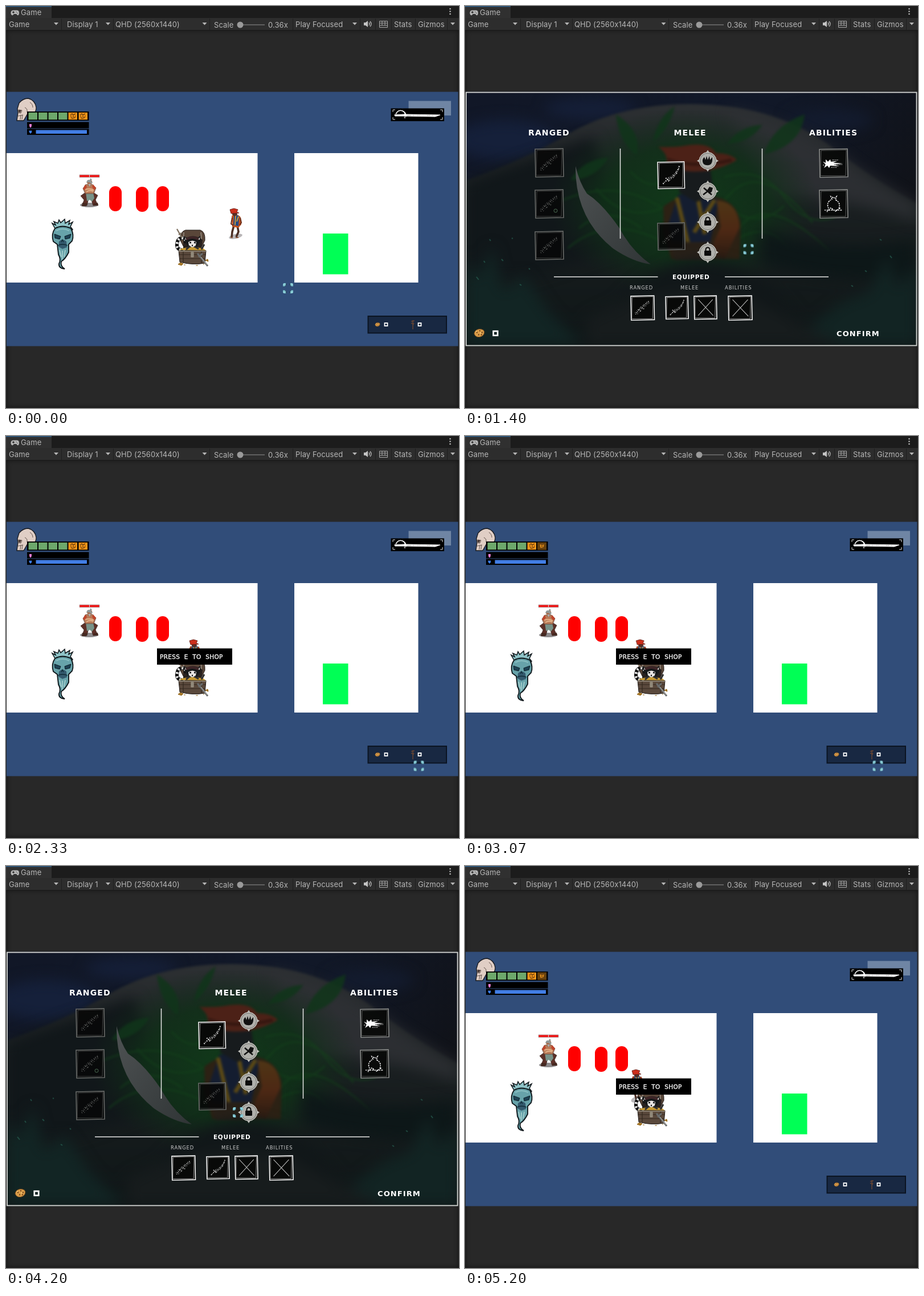
These frames come from a looping animation (795 by 705 pixels, 5270 ms). An HTML page:

```html
<!DOCTYPE html>
<html lang="en">
<head>
<meta charset="utf-8">
<title>Game view</title>
<style>
  html, body { margin: 0; width: 100%; height: 100%; overflow: hidden; background: #282828; }
  .well { position: absolute; inset: 42px 0 0 0; box-shadow: inset 0 0 9px #111; }
  svg { position: absolute; left: 0; top: 0; display: block; }
  .ui text { font: 13px Inter, "Open Sans", sans-serif; letter-spacing: .1px; fill: #b6b6b6; }
  .pix { font: bold 14px "DejaVu Sans", sans-serif; letter-spacing: 1.1px; fill: #fff; }
  .sub { font-size: 8.4px; font-weight: normal; letter-spacing: .9px; fill: #ccc; }
  .card { vector-effect: non-scaling-stroke; fill: #080908; stroke: currentColor; }
  .dim { color: #696b69; fill-opacity: .75; }
  .grey { color: #8b8d8b; fill-opacity: .8; }
  .lit { color: #f4f4f4; }
  .ink { fill: none; stroke: currentColor; }
  .soft { filter: blur(12px); }
  .haze { filter: blur(2px); }

  .aim, .pirate, .ghost, .torso, .dagger, .shop, .prompt, .hurt, .stride, .stand {
    animation: 5270ms linear infinite;
  }
  .aim { animation-name: aim; }
  .pirate { animation-name: walk; }
  .ghost { animation-name: bob; animation-timing-function: ease-in-out; }
  .torso { animation-name: breathe; animation-timing-function: ease-in-out; }
  .dagger { animation-name: fly; }
  .shop, .prompt, .hurt, .stride, .stand { animation-timing-function: step-end; }
  .shop { animation-name: shop; }
  .prompt { animation-name: prompt; }
  .hurt { animation-name: hurt; }
  .stride { animation-name: stride; }
  .stand { animation-name: stand; }

  @keyframes aim {
    0% { transform: translate(495px, 495px); animation-timing-function: steps(8); }
    10.03%, 29.01% { transform: translate(497.5px, 426.5px); animation-timing-function: steps(6); }
    36.61% { transform: translate(749px, 570px); animation-timing-function: steps(2); }
    39.14% { transform: translate(729px, 582px); animation-timing-function: step-end; }
    40.41%, 69.52% { transform: translate(724.5px, 578.5px); animation-timing-function: steps(2); }
    72.05% { transform: translate(690px, 588px); animation-timing-function: steps(5); }
    78.38% { transform: translate(415px, 425px); animation-timing-function: step-end; }
    79.65% { transform: translate(407px, 432px); animation-timing-function: steps(6); }
    87.24% { transform: translate(288.5px, 682px); animation-timing-function: steps(2); }
    89.77%, 100% { transform: translate(280px, 725px); }
  }
  @keyframes walk {
    0% { transform: translate(0, 0); animation-timing-function: steps(10); }
    12.56% { transform: translate(6px, 2px); animation-timing-function: steps(3); }
    16.36% { transform: translate(-2.5px, 2px); animation-timing-function: steps(6); }
    23.95%, 54.33% { transform: translate(-71px, 2px); animation-timing-function: steps(4); }
    59.39%, 100% { transform: translate(-100px, 2px); }
  }
  @keyframes bob {
    0% { transform: translateY(0); }
    12.56% { transform: translateY(3.3px); }
    25.22%, 44.2% { transform: translateY(0); }
    56.86% { transform: translateY(3.3px); }
    64.46%, 80.91% { transform: translateY(.7px); }
    85.98% { transform: translateY(0); }
    98.63%, 100% { transform: translateY(3.1px); }
  }
  @keyframes breathe {
    0%, 25.22%, 44.2%, 85.98% { transform: translateY(0); }
    12.56%, 56.86%, 100% { transform: translateY(1px); }
    64.46%, 80.91% { transform: translateY(.3px); }
  }
  @keyframes fly {
    0%, 80.9% { transform: translate(310px, 382px); visibility: hidden; }
    80.91% { transform: translate(310px, 382px); visibility: visible; animation-timing-function: steps(5); }
    87.24% { transform: translate(710px, 240px); visibility: visible; animation-timing-function: steps(2); }
    89.77% { transform: translate(870px, 183px); visibility: visible; }
    89.8%, 100% { transform: translate(870px, 183px); visibility: hidden; }
  }
  @keyframes shop {
    0% { opacity: 0; }
    25.22% { opacity: .6; }
    26.48% { opacity: 1; }
    44.2% { opacity: 0; }
    64.46% { opacity: .6; }
    65.72% { opacity: 1; }
    80.91%, 100% { opacity: 0; }
  }
  @keyframes prompt { 0% { visibility: hidden; } 22.68%, 100% { visibility: visible; } }
  @keyframes hurt { 0% { opacity: 0; } 56.86%, 100% { opacity: 1; } }
  @keyframes stride {
    0%, 7.49%, 17.62%, 22.68% { opacity: 1; }
    3.7%, 11.29%, 20.15%, 23.95%, 100% { opacity: 0; }
  }
  @keyframes stand {
    0%, 7.49%, 17.62%, 22.68% { opacity: 0; }
    3.7%, 11.29%, 20.15%, 23.95%, 100% { opacity: 1; }
  }
</style>
</head>
<body>
<div class="well"></div>
<svg width="795" height="705" viewBox="0 0 795 705">
  <defs>
    <clipPath id="view"><rect x="1" y="150.500" width="792.500" height="446"/></clipPath>
    <radialGradient id="glow"><stop offset="0" stop-color="#113a1a"/><stop offset=".6" stop-color="#103018" stop-opacity=".85"/><stop offset="1" stop-color="#122a1a" stop-opacity="0"/></radialGradient>
    <linearGradient id="night" x2="1" y2=".4"><stop offset="0" stop-color="#111727"/><stop offset=".6" stop-color="#111828"/><stop offset="1" stop-color="#101218"/></linearGradient>
    <linearGradient id="dome" x2="0" y2="1"><stop offset="0" stop-color="#2d3033"/><stop offset=".35" stop-color="#1b2022"/><stop offset="1" stop-color="#0f1617"/></linearGradient>
    <linearGradient id="steel" x2="1" y2="1"><stop offset="0" stop-color="#4e5253"/><stop offset="1" stop-color="#303536"/></linearGradient>
    <linearGradient id="sleeve" x2="0" y2="1"><stop offset="0" stop-color="#4f3515"/><stop offset=".5" stop-color="#4d2814"/><stop offset="1" stop-color="#2a1b12"/></linearGradient>
    <path id="drop" d="M-4-2h8l-4 4.500z" fill="#b6b6b6"/>
    <rect id="pill" width="22" height="44" rx="11" fill="#f00"/>
    <rect id="cell" width="15.500" height="12.500"/>
    <rect id="zero" x="-2.500" y="-2.500" width="5" height="5" fill="none" stroke="#fff" stroke-width="1.800"/>
    <g id="cookie">
      <path d="M-9 1Q-8-6 0-7Q8-7 9-2Q9 5 1 7Q-7 8-9 1Z" fill="#d99c48" stroke="#6d451d"/>
      <path d="M-5-1h2M0-4h2M4-1h2M-2 3h2M3 3h2" stroke="#6b3b18" stroke-width="2"/>
      <path d="M-6-3h2M1 0h2" stroke="#f3cf86" stroke-width="1.500"/>
    </g>
    <path id="bite" d="M-5-2l3-2 2 2 4-2M-4 2l2 2 4-1 2-2M-1 0l2 1M-4-1v2M4-1v1" fill="none" stroke="#6b4012" stroke-width="1.500"/>
    <g id="frame">
      <path class="card" d="M0 1 49 0 50 49 1 50Z" stroke-width="1.600"/>
      <path class="card" d="M3 3 47 2 46 47 2 47Z" stroke-width=".7" opacity=".8"/>
    </g>
    <g id="gun" class="ink" opacity=".85">
      <path d="M10 38L17 29 38 12M17 29l5 3M24 25l4 2" stroke-width="2.400" stroke-dasharray="1 2.400 1.500 1.800"/>
      <path d="M9 35L18 25 38 10M14 38L22 29 40 14" stroke-width="1" stroke-dasharray="2 3 1 2"/>
    </g>
    <g id="blade" class="ink" opacity=".9">
      <path d="M10 41L18 33M15 30L22 37M18 33Q34 28 40 8" stroke-width="2.200" stroke-dasharray="2 1.600 1 2"/>
      <path d="M21 35Q37 27 40 9M19 30Q30 25 35 17" stroke-width="1" stroke-dasharray="3 2 1 3"/>
    </g>
    <path id="cross" class="ink" d="M9 8L42 42M41 8L9 42" stroke-width="1.300" opacity=".75"/>
    <g id="medal">
      <path d="M0-19L4-13H-4ZM0 19L4 13H-4ZM-19 0L-13-4V4ZM19 0L13-4V4Z" fill="#b9b9b4"/>
      <circle r="15" fill="#b0b0ab" stroke="#cfcfca" stroke-width="1"/>
      <circle r="13.500" fill="none" stroke="#62645f" stroke-width=".8"/>
    </g>
    <g id="lock"><rect x="-6" y="-2" width="12" height="9" rx="1" fill="#0b0b0b"/><path d="M-3.500-2V-4a3.500 3.500 0 0 1 7 0V-2" fill="none" stroke="#0b0b0b" stroke-width="2"/></g>
    <g id="corner"><path d="M-9-7.500L-7.500-9H-3.500V-5.500L-5-3.500H-9Z" fill="#7dc3cf"/><path d="M-3.500-8.500V-5.500L-5.500-3.500" fill="none" stroke="#24404f"/><path d="M-8-7h2" stroke="#b9e4ea"/></g>
  </defs>

  <!-- editor chrome -->
  <g class="ui">
    <path d="M0 0H795V21H0Z" fill="#1c1c1c"/>
    <path d="M0 0H80V21H0Z" fill="#303030"/>
    <path d="M0 .8H80" stroke="#2c5d87" stroke-width="1.600"/>
    <path d="M0 21H795V42H0Z" fill="#2d2d2d"/>
    <path d="M0 42.500H795" stroke="#191919"/>
    <path d="M97.500 22V42M188.500 22V42M357.500 22V42M503.500 22V42M621.500 22V42M648.500 22V42M676.500 22V42M718.500 22V42M774.500 22V42" stroke="#1f1f1f"/>
    <path d="M12 7.500H20Q23 8 23 12T20.500 16.500L18 14H14L11.500 16.500Q8.500 16 8.500 12T12 7.500Z" fill="#b6b6b6"/>
    <path d="M11 11h4M13 9v4M18 10v1M20 12v1" stroke="#303030" stroke-width="1.300"/>
    <g fill="#bbb"><circle cx="779.500" cy="5" r="1.300"/><circle cx="779.500" cy="9.500" r="1.300"/><circle cx="779.500" cy="14" r="1.300"/></g>
    <text x="26" y="16">Game</text>
    <text x="5" y="37">Game</text>
    <text x="107" y="37">Display 1</text>
    <text x="192" y="37">QHD (2560x1440)</text>
    <text x="365" y="38">Scale</text>
    <text x="460" y="38">0.36x</text>
    <text x="508" y="37">Play Focused</text>
    <text x="681" y="37">Stats</text>
    <text x="723" y="37">Gizmos</text>
    <use href="#drop" x="88" y="31"/><use href="#drop" x="179" y="31"/><use href="#drop" x="348.500" y="31"/><use href="#drop" x="612" y="31"/><use href="#drop" x="784" y="31"/>
    <path d="M415 33H454" stroke="#606060" stroke-width="2"/><circle cx="411" cy="33" r="5.500" fill="#9a9a9a"/>
    <path d="M628 29H631L635 26V37L631 34H628Z" fill="#c4c4c4"/>
    <path d="M637 29q2 2.500 0 5M639 27q4 4.500 0 9" fill="none" stroke="#c4c4c4" stroke-width="1.300"/>
    <path d="M655.500 26.500H669.500V37.500H655.500ZM655 30H670M655 34H670M660 26V34M665 26V34" fill="none" stroke="#aaa"/>
  </g>

  <g clip-path="url(#view)">
    <!-- scene -->
    <path d="M1 150H794V597H1Z" fill="#314d79"/>
    <path d="M1 258H441.500V485H1ZM506 258H723.500V485H506Z" fill="#fff"/>
    <path d="M556 399H600.500V470.500H556Z" fill="#00ff55"/>
    <use href="#pill" x="181" y="316"/><use href="#pill" x="228" y="317"/><use href="#pill" x="264" y="316"/>

    <!-- brawler -->
    <g>
      <path d="M129 296H164V300.500H129Z" fill="#ef1717" stroke="#aaa" stroke-width=".8"/><path d="M146.500 296V300" stroke="#ddd"/>
      <ellipse cx="146" cy="349" rx="16" ry="4" fill="#8d8a8c"/>
      <path d="M138 328L131 333 137 340 134 349 142 350 145 338 149 338 153 350 161 349 157 340 161 332 153 327Z" fill="#5d3028" stroke="#30201c" stroke-width=".7"/>
      <path d="M134 345l8 1-1 5h-8zM154 346l7-1 1 5h-8z" fill="#442820"/>
      <path d="M140 327H153L155 337 151 343 147 340 142 342Z" fill="#789389"/>
      <g class="torso">
        <path d="M140 313L135 320 139 329H154L158 319 152 313Z" fill="#b87b58" stroke="#56362c" stroke-width=".7"/>
        <path d="M139 313L135 321 139 323 142 317ZM153 313L158 319 155 323 151 317Z" fill="#c0452c"/>
        <path d="M139 322Q147 319 154 323M141 326Q147 322 153 325" fill="none" stroke="#e2b28a" stroke-width="2"/>
        <path d="M142 309Q142 305 147 305T151 310L148 317 144 315Z" fill="#a56d50"/>
        <path d="M141 310Q142 304 147 305L148 302 151 304 149 307Q154 309 150 312Q146 307 141 310Z" fill="#939a99"/>
        <path d="M144 312h5l-2 5z" fill="#a9adab"/>
      </g>
    </g>

    <!-- ghost -->
    <g class="ghost">
      <path d="M86 390L81 381 87 384 84 378 91 381 93 375 96 380 103 374 104 381 112 376 110 383 117 379 113 387 117 392 112 398H88Z" fill="#8fc4c8" stroke="#0a1115" stroke-width="1.500"/>
      <path d="M86 390Q99 383 114 390Q120 402 116 412L110 418 110 432Q104 444 97 448Q95 456 103 461Q92 460 93 452Q97 444 92 436L90 418 83 413Q79 400 86 390Z" fill="#67a3aa" stroke="#0a1115" stroke-width="1.800"/>
      <path d="M85 400L96 404 94 409 86 407ZM114 400L103 404 104 409 112 407Z" fill="#1e4355" stroke="#0b1c25"/>
      <path d="M93 413Q99 406 106 413L107 423 99 426 92 422Z" fill="#345a6e"/>
      <path d="M97 414l2-4 2 4M91 420Q99 416 108 420" fill="none" stroke="#102b36" stroke-width="1.300"/>
      <path d="M94 428L97 440M99 429L99 444M104 428L102 440" stroke="#b7dad6" stroke-width="1.300"/>
      <path d="M88 394q11-6 23 0" fill="none" stroke="#8bc0c3" stroke-width="2"/>
    </g>

    <!-- pirate -->
    <g class="pirate">
      <g class="stride">
        <ellipse cx="403" cy="404" rx="12" ry="4" transform="rotate(-12 403 404)" fill="#b9b6b8"/>
        <path d="M400 385L397 396 396 406M406 385L408 396 404 405" fill="none" stroke="#4d3025" stroke-width="3.600"/>
        <path d="M394 406h4M403 406h5" stroke="#8b5940" stroke-width="2"/>
        <path d="M396 368Q403 363 411 369L413 383 408 389 397 387Z" fill="#c5541f"/>
        <path d="M400 366L409 368 408 386 399 384Z" fill="#254a85"/><path d="M403 367L402 384M408 369L405 378" stroke="#e0a32f" stroke-width="1.700"/>
        <path d="M397 371L395 382 399 385M411 371L413 380 410 384" fill="none" stroke="#6c2e1b" stroke-width="2"/>
      </g>
      <g class="stand">
        <ellipse cx="401" cy="407" rx="10" ry="5" transform="rotate(-20 401 407)" fill="#bbb9bb"/>
        <path d="M398 384L398 396 401 409M404 384L405 396 403 410" fill="none" stroke="#4d3025" stroke-width="3.300"/>
        <path d="M394 368Q401 363 409 368L411 385 406 390 395 386Z" fill="#2b4f83"/>
        <path d="M396 367L391 379 393 383M408 368L412 377 412 384" fill="none" stroke="#a33f1d" stroke-width="3.200"/>
        <path d="M400 367L403 386M405 368L402 377" stroke="#dda739" stroke-width="1.700"/>
      </g>
      <path d="M397 361H405L406 366 401 369 397 366Z" fill="#562f26"/>
      <path d="M393 357L400 355 407 357 405 361 409 363 395 364Z" fill="#cb2f1c" stroke="#5f1b15" stroke-width=".8"/>
    </g>

    <!-- chest shopkeeper -->
    <g stroke-linejoin="round">
      <path d="M306 411Q306 395 315 393H341Q350 396 349 411L344 421H311Z" fill="#594639" stroke="#211b18"/>
      <path d="M312 397Q311 408 314 417M342 397Q344 408 341 418" fill="none" stroke="#8b8175" stroke-width="2"/>
      <path d="M311 410Q328 397 345 410L343 430H311Z" fill="#28211f"/>
      <path d="M314 428Q299 429 300 418T309 407Q316 406 315 416" fill="none" stroke="#111" stroke-width="6"/>
      <path d="M314 428Q299 429 300 418T309 407Q316 406 315 416" fill="none" stroke="#eee" stroke-width="4.600" stroke-dasharray="3 4"/>
      <path d="M314 413L313 404 320 408Q327 402 334 408L341 403 341 413 335 423H320Z" fill="#17191a"/>
      <path d="M315 410l-1-4 4 3zM340 410l0-4-4 3zM320 414Q327 409 334 414L333 420 327 424 321 420Z" fill="#e8e5e3"/>
      <path d="M322 415h3M330 415h3M326 420h2" stroke="#171717" stroke-width="2.300"/>
      <path d="M316 409Q327 403 338 409" fill="none" stroke="#3e2527" stroke-width="4"/>
      <path d="M304 428L309 425Q328 421 346 425L351 429Z" fill="#c79a34"/>
      <path d="M316 427L323 421M331 422L338 426M343 427L348 418" stroke="#30302f" stroke-width="3"/>
      <path d="M303 429H351L349 451Q327 455 305 449Z" fill="#5a493c" stroke="#211b18"/>
      <path d="M304 436H350M305 443H350M311 430V450M343 430V451" fill="none" stroke="#33291f" stroke-width="1.200"/>
      <path d="M303 430H351M325 432h4v8h-4z" fill="#8f8779" stroke="#99907f" stroke-width="1.300"/>
      <path d="M300 391L309 407M303 401L308 398" stroke="#817464" stroke-width="2.300"/>
      <path d="M336 434L354 456M338 440L345 434" stroke="#696b6b" stroke-width="3"/><path d="M342 440L353 454" stroke="#bcc0bf"/>
      <path d="M302 453l4-3 5 2-3 3zM350 446l4-2 1 4zM312 454h3M333 455h4M346 453h2" fill="#a87827" stroke="#95691f"/>
    </g>

    <g class="prompt">
      <path d="M265 372.500H397V401H265Z"/>
      <text class="pix" x="270" y="391" style="font-size:10.500px;font-weight:normal;letter-spacing:.3px;word-spacing:4px" stroke="#fff" stroke-width=".35">PRESS E TO SHOP</text>
    </g>

    <!-- status -->
    <path d="M19 201L21 187 20 180 23 170Q30 162 39 162Q51 165 53 178Q53 185 49 188L39 187 35 194 31 201Z" fill="#e0cec5" stroke="#17191e" stroke-width="1.300"/>
    <path d="M22 182l6 1-2 5-4-1zM21 193l9-2M26 191l-1 8M29 191l-1 8M33 178q5 2 4 8M42 169q5 3 5 9" fill="none" stroke="#66564f"/>
    <path d="M22 182l5 1-2 4-3-1z" fill="#4a3b37"/>
    <path d="M37 185H145.500V201H37ZM37 203.500H145.500V214.500H37ZM37 215.500H145.500V226H37Z"/>
    <g fill="#6da86b"><use href="#cell" x="39.500" y="186.800"/><use href="#cell" x="57" y="186.800"/><use href="#cell" x="74.500" y="186.800"/><use href="#cell" x="92" y="186.800"/></g>
    <g fill="#f59518"><use href="#cell" x="109.500" y="186.800"/><use href="#cell" x="127.500" y="186.800"/></g>
    <use href="#bite" x="118" y="193"/><use href="#bite" x="135" y="193"/>
    <g class="hurt"><use href="#cell" x="127.500" y="186.800" fill="#65400d"/><path d="M131 190L139 189 138 196 132 197Z" fill="#d58718"/><use href="#bite" x="135" y="193"/></g>
    <path d="M41 207h4v3l-1 3h-2l-1-3z" fill="#e87bd3"/>
    <path d="M40.500 218l2 1 2-1 1 3-2.500 3-2.500-3z" fill="#3c7ff0"/>
    <path d="M52.500 217.500H142V224H52.500Z" fill="#427ee5"/>
    <path d="M706.500 166.500H781V192H706.500Z" fill="#6f85a4"/>
    <path d="M675.500 179.500H769V202H675.500Z"/>
    <path d="M679 186V182H683M762 182H766V186M766 195V199H762M683 199H679V195" fill="none" stroke="#ddd"/>
    <path d="M682 191L699 190 762 191 753 194 699 193 683 193ZM700 186V197" fill="#fff" stroke="#fff" stroke-width="1.200"/>
    <path d="M684 190Q688 181 696 184Q702 187 702 194" fill="none" stroke="#fff" stroke-width="1.500"/>
    <path d="M704 192H754" stroke="#888" stroke-width=".7" stroke-dasharray="7 3 2 5"/>
    <path d="M635.500 544H773V573.500H635.500Z" fill="#182842" stroke="#0b1422" stroke-width="2"/>
    <use href="#cookie" transform="translate(652 558.500) scale(.48)"/>
    <use href="#zero" x="667" y="558.500"/><use href="#zero" x="726" y="558.500"/>
    <path d="M711 553l6-1M714 551V567M711 556l4 2M716 556l-2 4" stroke="#634435" stroke-width="1.600"/>

    <g class="dagger"><g transform="rotate(-8)"><path d="M-10 1L-4 0 10-2 5 2-4 2Z" fill="#8d8273"/><path d="M-10 2L-4 1M-4-2V4" stroke="#574231" stroke-width="1.500"/></g></g>

    <!-- shop -->
    <g class="shop">
      <path d="M1 150H794V597H1Z" fill="url(#night)"/>
      <g class="soft">
        <ellipse cx="70" cy="235" rx="90" ry="35" fill="#15203a"/><ellipse cx="220" cy="180" rx="80" ry="18" fill="#151f38"/>
        <ellipse cx="640" cy="200" rx="75" ry="20" fill="#131b2e"/>
      </g>
      <path class="haze" d="M0 307Q110 268 180 225Q270 172 395 172Q540 172 640 245Q720 308 795 347V600H0Z" fill="url(#dome)"/>
      <path class="soft" d="M0 310Q150 255 225 230L290 420 100 480 0 480Z" fill="#11171a"/>
      <path class="soft" d="M460 182Q600 210 690 285L795 350V378Q660 330 530 335Z" fill="#2f3135" opacity=".85"/>
      <ellipse cx="385" cy="345" rx="235" ry="165" fill="url(#glow)"/>
      <g fill="#10351a" class="haze" opacity=".85">
        <path d="M265 190Q312 220 301 262Q269 237 265 190ZM330 238Q359 216 368 176Q338 195 330 238ZM525 260Q538 211 596 190Q590 245 525 260ZM185 305Q208 268 252 266Q228 305 185 305ZM460 242Q480 211 522 208Q502 239 460 242Z"/>
        <path d="M150 350Q250 300 330 345T465 330T610 380M180 425Q250 365 340 410T480 390T640 430M230 320Q280 380 345 355M455 300Q520 280 560 335T650 370M460 420Q540 360 580 450M200 390q50-45 110 0M290 290q40 40 60 10M470 360q50 30 90-10" fill="none" stroke="#14441c" stroke-width="3" opacity=".7"/>
      </g>
      <path d="M194 281Q193 373 261 426Q295 449 326 453Q292 429 272 391Q242 347 214 329Q201 310 194 281Z" fill="url(#steel)"/>
      <g class="haze">
        <path d="M348 352Q390 318 449 337Q479 348 484 382L482 444H362L349 398Z" fill="#2c2114"/>
        <path d="M374 331Q419 326 445 341L428 428 366 441 357 382Z" fill="#141d30"/>
        <path d="M372 336L394 427M438 340L402 397M408 335L421 400" fill="none" stroke="#5d4a14" stroke-width="7"/>
        <path d="M441 341Q480 343 482 388L455 445 429 431 449 387Z" fill="url(#sleeve)"/>
        <path d="M374 282H430L437 330 406 344 376 327Z" fill="#171b1d"/>
        <path d="M339 247Q362 248 379 246Q429 236 440 258Q466 258 477 270Q456 283 425 289Q376 295 354 275Q356 259 339 247Z" fill="#4c2117"/>
        <path d="M355 269Q406 286 468 270" fill="none" stroke="#31150f" stroke-width="5"/>
        <path d="M358 414H437L430 446H368Z" fill="#282018"/>
      </g>
      <g class="soft">
        <path d="M210 596Q305 449 414 446Q535 449 614 596Z" fill="#111719"/>
        <path d="M520 390Q640 440 790 410V475Q640 490 520 450Z" fill="#0d1718"/>
        <path d="M0 440L22 478 48 420 67 500 103 472 150 540 210 596H0Z" fill="#122524"/>
        <path d="M795 455L758 493 742 437 710 500 660 520 560 596H795Z" fill="#122423"/>
        <path d="M210 550Q340 480 490 510L665 596H215Z" fill="#171c1d"/>
      </g>
      <path d="M20 475l4 5M43 409l2 3M64 444l3 3M96 488l3 2M112 460l2 2M728 409l3 2M746 438l3 4M702 464l3 2M678 490l3 2M82 407l2 1M33 447l2 3" stroke="#286052" stroke-width="2" opacity=".7"/>
      <rect x="2" y="151.500" width="790.500" height="444" fill="none" stroke="#d9dad7" stroke-width="1.800"/>

      <g class="pix">
        <text x="111" y="227">RANGED</text><text x="366.500" y="227">MELEE</text><text x="604" y="227">ABILITIES</text>
        <text x="364" y="479" style="font-size:10.500px;letter-spacing:.7px">EQUIPPED</text>
        <text x="652" y="579" style="font-size:13px">CONFIRM</text>
        <text class="sub" x="289" y="497">RANGED</text><text class="sub" x="378" y="497">MELEE</text><text class="sub" x="456" y="497">ABILITIES</text>
      </g>
      <path d="M272.500 250V408M521.500 250V408M156 475H338.500M456 475H638" stroke="#e7e8e6" stroke-width="1.500"/>

      <g class="dim">
        <g transform="translate(123 250)"><use href="#frame"/><use href="#gun"/></g>
        <g transform="translate(123 322)"><use href="#frame"/><use href="#gun"/><circle cx="36" cy="37" r="3" fill="none" stroke="#496850"/></g>
        <g transform="translate(123 395)"><use href="#frame"/><use href="#gun"/></g>
        <g transform="translate(338 380) scale(.96)"><use href="#frame"/><use href="#gun"/></g>
      </g>
      <g class="lit">
        <g transform="translate(338 273) scale(.95)"><use href="#frame"/><use href="#blade"/></g>
        <g transform="translate(291 508) scale(.83 .86)"><use href="#frame"/><use href="#gun"/></g>
        <g transform="translate(352 509) scale(.8)"><use href="#frame"/><use href="#blade"/></g>
        <g transform="translate(402 508) scale(.8 .83)"><use href="#frame"/><use href="#cross"/></g>
        <g transform="translate(462 508) scale(.84 .86)"><use href="#frame"/><use href="#cross"/></g>
      </g>
      <g class="grey"><use href="#frame" x="622" y="250.500"/><use href="#frame" x="622" y="322"/></g>
      <path d="M628 273L633 275 633 269 637 273 641 269 642 273 653 272 646 275 663 276 647 278 657 281 641 280 639 284 636 280 630 284 633 278Z" fill="#fff"/>
      <path d="M645 270h11M650 278h12M628 279h5M643 283h9" stroke="#eee" stroke-dasharray="2 1.500"/>
      <path d="M638 355Q633 344 644 339L642 334 648 337 652 334 650 340Q660 344 656 356M631 358H662M635 361L642 354 650 360 659 354" fill="none" stroke="#f3f3f3" stroke-width="1.600" stroke-dasharray="2 1.600 3 1.300"/>

      <use href="#medal" x="426" y="271.500"/><use href="#medal" x="426" y="325"/><use href="#medal" x="426" y="379"/><use href="#medal" x="426" y="432"/>
      <path d="M418 276Q415 269 420 265L422 270 424 263 426 270 429 263 430 270 434 265Q435 278 428 279Q421 280 418 276Z" fill="#111"/>
      <path d="M419 319L433 331M418 331L427 324" stroke="#111" stroke-width="2.600"/><path d="M425 323L429 317 435 319 433 326 428 329Z" fill="#111"/>
      <use href="#lock" x="426" y="378"/><use href="#lock" x="426" y="431"/>
      <use href="#cookie" x="25" y="573.500"/>
      <use href="#zero" transform="translate(53.500 574) scale(1.500)"/>
    </g>
  </g>

  <g class="aim">
    <use href="#corner"/><use href="#corner" transform="scale(-1 1)"/><use href="#corner" transform="scale(1 -1)"/><use href="#corner" transform="scale(-1)"/>
  </g>
</svg>
</body>
</html>
```
